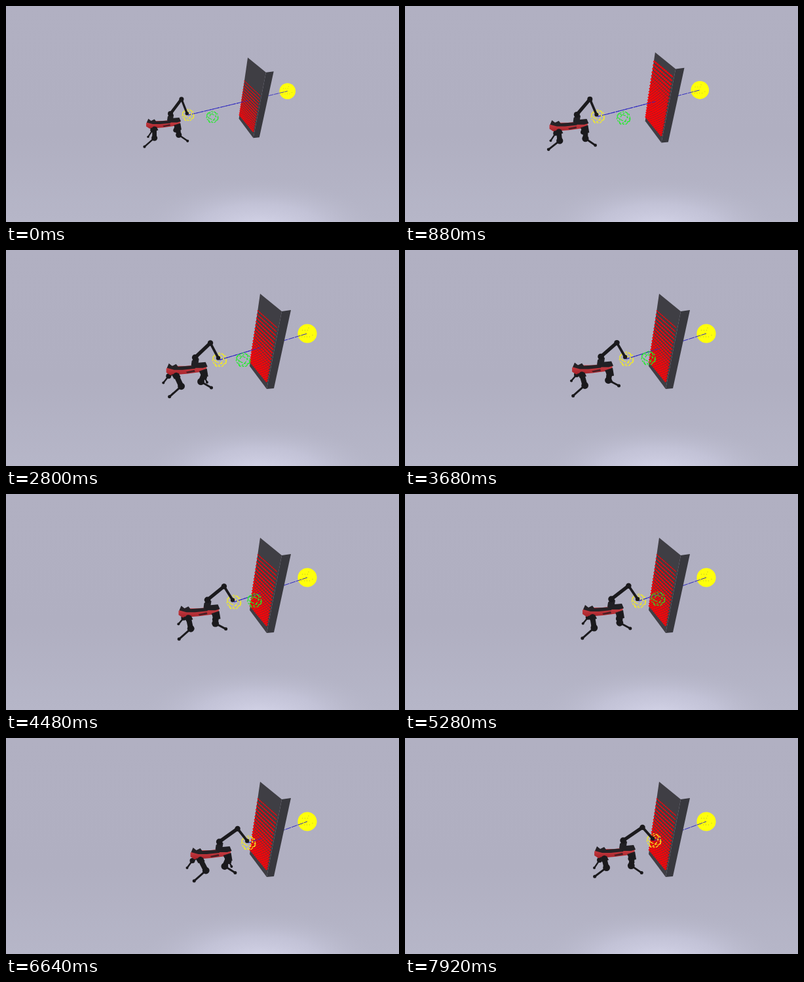
Recreate the animation shown at these times as an HTML page. Size 600 by 331 pixels, loop 8000 ms.

```html
<!DOCTYPE html>
<html lang="en">
<head>
<meta charset="utf-8">
<title>Robot reaching around a wall</title>
<style>
html, body { margin: 0; width: 100%; height: 100%; overflow: hidden; background: #b2b1c3; }
svg { display: block; width: 100vw; height: 100vh; }
.ray { stroke: #2d27c0; stroke-width: 1; }
.limb { fill: none; stroke: #1b1a1d; stroke-linecap: round; }
.wire { fill: none; stroke-width: 1.2; stroke-dasharray: 5 1.5 3 2; }
</style>
</head>
<body>
<svg viewBox="0 0 600 331" preserveAspectRatio="none">
  <defs>
    <linearGradient id="sky" x1="0" y1="0" x2="0" y2="1">
      <stop offset="0" stop-color="#b1b0c2"/>
      <stop offset=".6" stop-color="#b0afc1"/>
      <stop offset="1" stop-color="#b6b6c8"/>
    </linearGradient>
    <radialGradient id="glow">
      <stop offset="0" stop-color="#d6d6ea"/>
      <stop offset=".5" stop-color="#c8c8dd" stop-opacity=".7"/>
      <stop offset="1" stop-color="#b6b6c8" stop-opacity="0"/>
    </radialGradient>
    <linearGradient id="shell" x1="0" y1="0" x2="0" y2="1">
      <stop offset="0" stop-color="#d5484c"/>
      <stop offset="1" stop-color="#a5222a"/>
    </linearGradient>
    <g id="ball">
      <path d="M-8 -7L1 -11L9 -6L11 3L4 10L-5 10L-11 2Z"/>
      <ellipse rx="11" ry="4.5" transform="rotate(24)"/>
      <ellipse rx="10" ry="5" transform="rotate(-58)"/>
    </g>
  </defs>
  <rect width="600" height="331" fill="url(#sky)"/>
  <ellipse cx="388" cy="342" rx="190" ry="78" fill="url(#glow)"/>
  <g id="scene">
    <circle cx="460" cy="128" r="14.6" fill="#ffff0c"/>
    <path d="M452 123h12M451 133h14M462 119v3M468 130v4" stroke="#a5a530" stroke-width=".8" stroke-dasharray="1 3"/>
    <line id="ray" class="ray" x2="460" y2="128" stroke-dasharray="9 1"/>
    <polygon points="421,94 435,92 409,212 398,213" fill="#38383e"/>
    <polygon points="388,67 421,94 398,213 372,178" fill="#3f3e44"/>
    <g id="rows" stroke="#f5050a" stroke-dasharray="3 .5"></g>
    <line id="near" class="ray" stroke-dasharray="6 1.5"/>
    <use id="goal" href="#ball" class="wire" stroke="#20ee28"/>
    <g id="far"></g>
    <g id="body">
      <path d="M0 -2L4 -6L30 -6L57 -9L62 -6L61 -1L54 3L31 6L6 8L0 4Z" fill="url(#shell)"/>
      <path d="M1 -3L4 -10L9 -6L15 -9L18 -5L46 -7L44 -2L25 0L12 0Z" fill="#252226"/>
      <path d="M30 3L43 0L44 3L32 5Z" fill="#4b1f25"/>
      <path d="M38 -7L39 -14L46 -20L50 -17L49 -11L60 -12L63 -5L56 -3L44 -3Z" fill="#212024"/>
      <path d="M8 7L19 5L22 11L12 14ZM50 2L62 -2L64 10L55 12Z" fill="#1e1d20"/>
    </g>
    <g id="legs"></g>
    <use id="grip" href="#ball" class="wire" stroke="#f5ee20"/>
    <g id="arm"></g>
  </g>
</svg>
<script>
const NS = 'http://www.w3.org/2000/svg';
const LOOP = 8000, STEP = 80, ZOOM_TIME = 1.3, ROWS = 22, GAIT = 1.29;
const SUN = [460, 128], HIT_X = 390;

const $ = id => document.getElementById(id);
const mix = (a, b, u) => a + (b - a) * u;
const shift = (a, x, y) => [a[0] + x, a[1] + y];
const clamp = n => Math.max(0, Math.min(1, n));
const set = (el, attrs) => { for (const k in attrs) el.setAttribute(k, attrs[k]); };
const place = (id, [x, y]) => set($(id), { transform: `translate(${x} ${y})` });
const add = (parent, tag, attrs) => {
  const el = parent.appendChild(document.createElementNS(NS, tag));
  set(el, attrs);
  return el;
};

// Two bars joined by a round joint, with a round tip
function makeLimb(parent, upper, lower, joint, tip) {
  const bar = w => add(parent, 'line', { class: 'limb', 'stroke-width': w });
  const dot = r => add(parent, 'circle', { r, fill: '#1a191c' });
  const bars = [bar(upper), bar(lower)], dots = [dot(joint), dot(tip)];
  return (...points) => {
    bars.forEach((el, i) => set(el, {
      x1: points[i][0], y1: points[i][1], x2: points[i + 1][0], y2: points[i + 1][1]
    }));
    dots.forEach((el, i) => set(el, { cx: points[i + 1][0], cy: points[i + 1][1] }));
  };
}

// Offsets from the body; diagonal legs share the swing sign
const legs = [
  { hip: [9, 4], knee: [8, -12], foot: [-1, 23], swing: -4.5, far: true },
  { hip: [54, 3], knee: [-4, -8], foot: [60, 19], swing: 3, far: true },
  { hip: [15, 8], knee: [18, -16], foot: [1.5, 41], swing: 4.5 },
  { hip: [58, 5], knee: [-16, -11], foot: [71.5, 30.5], swing: -3.5 }
];
for (const leg of legs) {
  leg.pose = leg.far ? makeLimb($('far'), 5.5, 2.4, 4, 2) : makeLimb($('legs'), 8, 3, 5.4, 2.5);
}
const poseArm = makeLimb($('arm'), 5.4, 3.8, 4.2, 3.2);
const shoulderDot = add($('arm'), 'circle', { r: 4.8, fill: '#1a191c' });

// Rows crowd together towards the foot of the wall
const rows = Array.from({ length: ROWS }, (_, k) => {
  const u = (k + .3) / ROWS, v = .95 * u * (1.3 - .3 * u);
  const el = add($('rows'), 'line', {
    x1: mix(387.5, 371.5, v), y1: mix(67, 178, v), x2: mix(419, 397, v), y2: mix(92, 210, v)
  });
  return { el, v, gap: 6.2 - 2.6 * u };
});

function drawRows(t, zoom) {
  const pulse = Math.max(0, Math.cos(2 * Math.PI * (t * GAIT - .17))) ** 3 * (1 - t / 8) * zoom;
  const top = mix(.36, .2, zoom) - .3 * pulse;
  for (const { el, v, gap } of rows) {
    const depth = v - top;
    set(el, {
      'stroke-width': gap * Math.min(.95, .22 + .4 * pulse + depth * .95),
      visibility: depth < 0 ? 'hidden' : 'visible'
    });
  }
}

function drawLegs(t, body) {
  const phase = 2 * Math.PI * t * GAIT;
  for (const { hip, knee, foot, swing, pose } of legs) {
    const lift = 5 * Math.max(0, Math.sin(phase) * Math.sign(swing));
    const toe = shift(shift(body, ...foot), -swing * Math.cos(phase), -lift);
    pose(shift(body, ...hip), shift(toe, knee[0], knee[1] + lift * .5), toe);
  }
}

function draw(t) {
  const zoom = clamp(t / ZOOM_TIME);
  set($('scene'), {
    transform: `translate(${mix(42, 0, zoom)} ${mix(22.6, 0, zoom)}) scale(${mix(.843, 1, zoom)})`
  });

  // The gripper slows down as it nears the wall
  const grip = [280 + 18.5 * t - .74 * t * t, 171.5 - .7 * t - .14 * t * t];
  const body = [grip[0] - 76 - 1.9 * t, 188 - 1.5 * t];
  const hand = shift(grip, -2, -3);
  const shoulder = shift(body, 44, -19);

  drawRows(t, zoom);
  place('body', body);
  drawLegs(t, body);
  poseArm(shoulder, shift(hand, -10 - .7 * t, -26 + 1.1 * t), hand);
  set(shoulderDot, { cx: shoulder[0], cy: shoulder[1] });

  place('grip', grip);
  place('goal', shift(grip, 44 - 2.8 * t, 3.5 - 1.3 * t));
  set($('goal'), { opacity: clamp(6.1 - t) });

  const [x1, y1] = grip;
  set($('ray'), { x1, y1 });
  set($('near'), { x1, y1, x2: HIT_X, y2: mix(y1, SUN[1], (HIT_X - x1) / (SUN[0] - x1)) });
}

const start = performance.now();
function tick() {
  const ms = Math.max(0, performance.now() - start) % LOOP;
  draw(Math.floor(ms / STEP) * STEP / 1000);
  requestAnimationFrame(tick);
}
tick();
</script>
</body>
</html>
```
